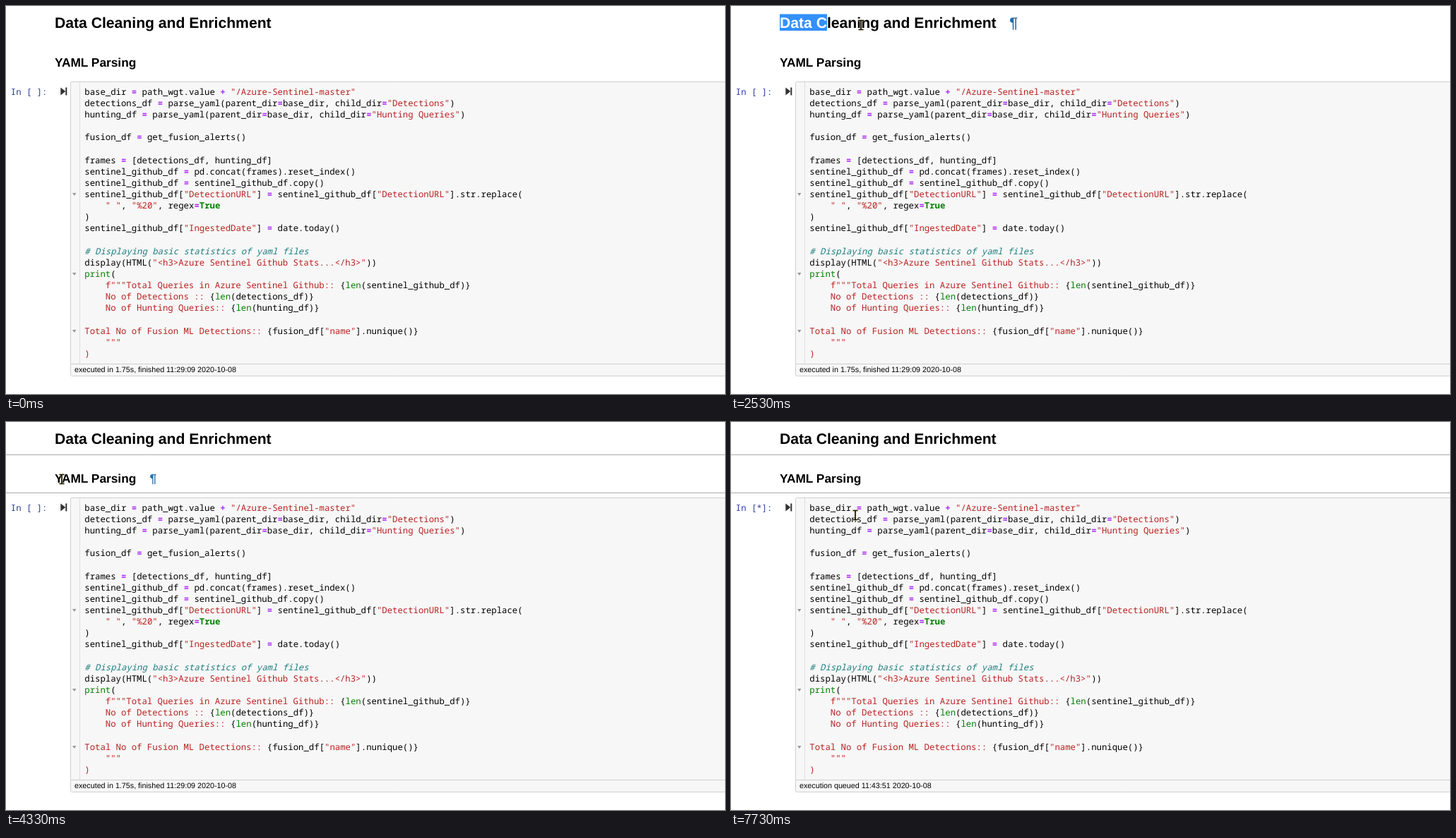
These frames come from a looping animation (1018 px wide and 550 px high, 8000 ms). An HTML page with a canvas:

```html
<!DOCTYPE html>
<html lang="en">
<head>
<meta charset="utf-8">
<title>Notebook</title>
<style>
html, body { margin: 0; width: 100%; height: 100%; overflow: hidden; background: #fff; }
canvas { display: block; }
</style>
</head>
<body>
<canvas id="stage" width="1018" height="550"></canvas>
<script>
const ctx = document.getElementById('stage').getContext('2d');
ctx.textRendering = 'geometricPrecision';
const LOOP = 8000, TICK = 1000 / 15;
const SANS = '"Liberation Sans", Arial, sans-serif';
const CODE_SIZE = 12.31, CHAR_W = CODE_SIZE * 0.6;
const CODE_X = 111.3, CODE_Y = 125.8, LINE_H = 16.13;
const RED = '#ba2121', GREEN = '#008000', PURPLE = '#aa22ff', TEAL = '#1f7d80', LINK = '#296eaa';

const CODE = `base_dir = path_wgt.value + "/Azure-Sentinel-master"
detections_df = parse_yaml(parent_dir=base_dir, child_dir="Detections")
hunting_df = parse_yaml(parent_dir=base_dir, child_dir="Hunting Queries")

fusion_df = get_fusion_alerts()

frames = [detections_df, hunting_df]
sentinel_github_df = pd.concat(frames).reset_index()
sentinel_github_df = sentinel_github_df.copy()
sentinel_github_df["DetectionURL"] = sentinel_github_df["DetectionURL"].str.replace(
    " ", "%20", regex=True
)
sentinel_github_df["IngestedDate"] = date.today()

# Displaying basic statistics of yaml files
display(HTML("<h3>Azure Sentinel Github Stats...</h3>"))
print(
    f"""Total Queries in Azure Sentinel Github:: {len(sentinel_github_df)}
    No of Detections :: {len(detections_df)}
    No of Hunting Queries:: {len(hunting_df)}

Total No of Fusion ML Detections:: {fusion_df["name"].nunique()}
    """
)`.split('\n');
const DOC_START = 17, FOLDS = [9, 16, 21];

const H2 = { text: 'Data Cleaning and Enrichment', size: 21.15, base: 31, top: 11.4, bottom: 35, link: 394.2 };
const H3 = { text: 'YAML Parsing', size: 17.3, base: 86, top: 71, bottom: 90, link: 203.4 };

// Tracks: [tick, value...], linear between entries
const POINTER = [
  [6, 1009, 536], [10, 443, 273], [14, 443, 273], [15, 371, 242.5],
  [19, 46, 8.5], [20, 54, 13.5], [21, 54, 13.5], [26, 72, 22], [33, 71, 27],
  [34, 71, 27], [38, 184, 27], [45, 363, 27.5], [48, 363, 27.5], [49, 352, 30.5],
  [56, 130, 100], [57, 130, 100], [60, 86, 85.5], [62, 86, 85.5],
  [65, 78.5, 81], [68, 78.5, 81], [71, 74, 80.5], [72, 74, 80.5],
  [80, 175, 81.5], [82, 175, 81.5], [83, 173.5, 81.5], [88, 76, 128],
  [90, 79, 134], [104, 79, 134], [105, 90, 136], [109, 180, 131.5],
  [112, 180, 131.5], [116, 176, 131.5]
];
const H2_SELECT = [[34, 0], [38, 6], [45, 27]];
const H3_SELECT = [[72, 0], [80, 11]];

function at(track, k) {
  const i = track.findIndex(p => p[0] > k);
  if (i < 0) return track[track.length - 1].slice(1);
  if (i === 0) return track[0].slice(1);
  const a = track[i - 1], b = track[i], u = (k - a[0]) / (b[0] - a[0]);
  return a.slice(1).map((v, j) => v + (b[j + 1] - v) * u);
}

function rect(x, y, w, h, color) {
  ctx.fillStyle = color;
  ctx.fillRect(x, y, w, h);
}

function text(str, x, y, font, color) {
  ctx.font = font;
  ctx.fillStyle = color;
  ctx.fillText(str, x, y);
}

function poly(points, color) {
  ctx.fillStyle = color;
  ctx.beginPath();
  points.forEach(([x, y]) => ctx.lineTo(x, y));
  ctx.fill();
}

function mono(str, x, y, color, style = '') {
  text(str, x, y, `${style} ${CODE_SIZE}px "Noto Sans Mono", "DejaVu Sans Mono", monospace`, color);
}

// Splits plain code into [text, colour, style]
function lex(src) {
  const parts = src.split(/(#.*|"[^"]*"|[=+]|\bTrue\b|\bprint\b|\blen\b)/);
  return parts.filter(Boolean).map(s => {
    if (s[0] === '#') return [s, TEAL, 'italic'];
    if (s[0] === '"') return [s, RED];
    if (s === '=' || s === '+') return [s, PURPLE, 'bold'];
    if (s === 'True') return [s, GREEN, 'bold'];
    if (s === 'print' || s === 'len') return [s, GREEN];
    return [s, '#000'];
  });
}

function lexDoc(src) {
  return src.split(/(\{.*\})/).filter(Boolean)
    .flatMap(s => s[0] === '{' ? lex(s) : [[s, RED]]);
}

const TOKENS = CODE.map((s, i) => i < DOC_START ? lex(s) : lexDoc(s));

function drawCode() {
  TOKENS.forEach((line, row) => {
    let col = 0;
    for (const [s, color, style] of line) {
      mono(s, CODE_X + col * CHAR_W, CODE_Y + row * LINE_H, color, style);
      col += s.length;
    }
  });
}

function drawCell(queued) {
  ctx.fillStyle = '#f7f7f7';
  ctx.strokeStyle = '#cfcfcf';
  ctx.lineWidth = 1;
  ctx.beginPath();
  ctx.roundRect(91.5, 107.5, 940, 417, 2);
  ctx.fill();
  ctx.stroke();
  rect(104, 108, 1, 399, '#dddddd');
  rect(92, 507, 926, 1, '#cfcfcf');
  for (const row of FOLDS) {
    const y = Math.round(CODE_Y - 6 + row * LINE_H);
    poly([[94, y], [99.5, y], [96.75, y + 4]], '#999');
  }
  drawCode();
  mono(queued ? 'In [*]:' : 'In [ ]:', 6.8, CODE_Y, '#303f9f');
  poly([[77.3, 115.5], [84.3, 121], [77.3, 126.5]], '#333');
  rect(84.3, 115.5, 2, 11, '#333');
  const note = queued ? 'execution queued 11:43:51 2020-10-08'
                      : 'executed in 1.75s, finished 11:29:09 2020-10-08';
  text(note, 97, 519, `10.74px ${SANS}`, '#000');
}

function drawHeading(h, count, hover) {
  const font = `bold ${h.size}px ${SANS}`, x = 69;
  text(h.text, x, h.base, font, '#000');
  if (hover) text('¶', h.link, h.base, font, LINK);
  if (!count) return;
  const w = ctx.measureText(h.text.slice(0, count)).width;
  ctx.save();
  ctx.beginPath();
  ctx.rect(x, h.top, w, h.bottom - h.top);
  ctx.clip();
  rect(x, h.top - 1, w + 1, h.bottom - h.top + 2, '#3390ff');
  text(h.text, x, h.base, font, '#fff');
  ctx.restore();
}

function drawPointer(x, y) {
  ctx.save();
  ctx.translate(Math.round(x), Math.round(y));
  for (const [w, color] of [[3.4, 'rgba(255,240,160,.5)'], [1.7, '#111']]) {
    ctx.lineWidth = w;
    ctx.strokeStyle = color;
    ctx.beginPath();
    ctx.moveTo(-3.5, -6.5);
    ctx.lineTo(3.5, -6.5);
    ctx.moveTo(0, -6.5);
    ctx.lineTo(0, 6.5);
    ctx.moveTo(-3.5, 6.5);
    ctx.lineTo(3.5, 6.5);
    ctx.stroke();
  }
  ctx.restore();
}

function draw(ms) {
  const k = Math.floor((ms + 4) / TICK);
  const [x, y] = at(POINTER, k);
  const over = (top, bottom) => k >= 6 && x >= 69 && y > top && y < bottom;
  const picked = (track, end) => k < end ? Math.round(at(track, k)[0]) : 0;

  rect(0, 0, 1018, 550, '#fff');
  if (k >= 50 && k < 59) rect(0, 45, 1018, 1, '#ababab');
  if (k >= 59) {
    rect(0, 46, 1018, 1, '#ababab');
    rect(0, 100, 1018, 1, '#ababab');
  }
  drawHeading(H2, picked(H2_SELECT, 59), over(10, 38));
  drawHeading(H3, picked(H3_SELECT, 94), over(69, 93));
  drawCell(k >= 95);
  if (k >= 6) drawPointer(x, y);
}

const start = performance.now();
function loop() {
  draw((performance.now() - start) % LOOP);
  requestAnimationFrame(loop);
}
loop();
</script>
</body>
</html>
```
